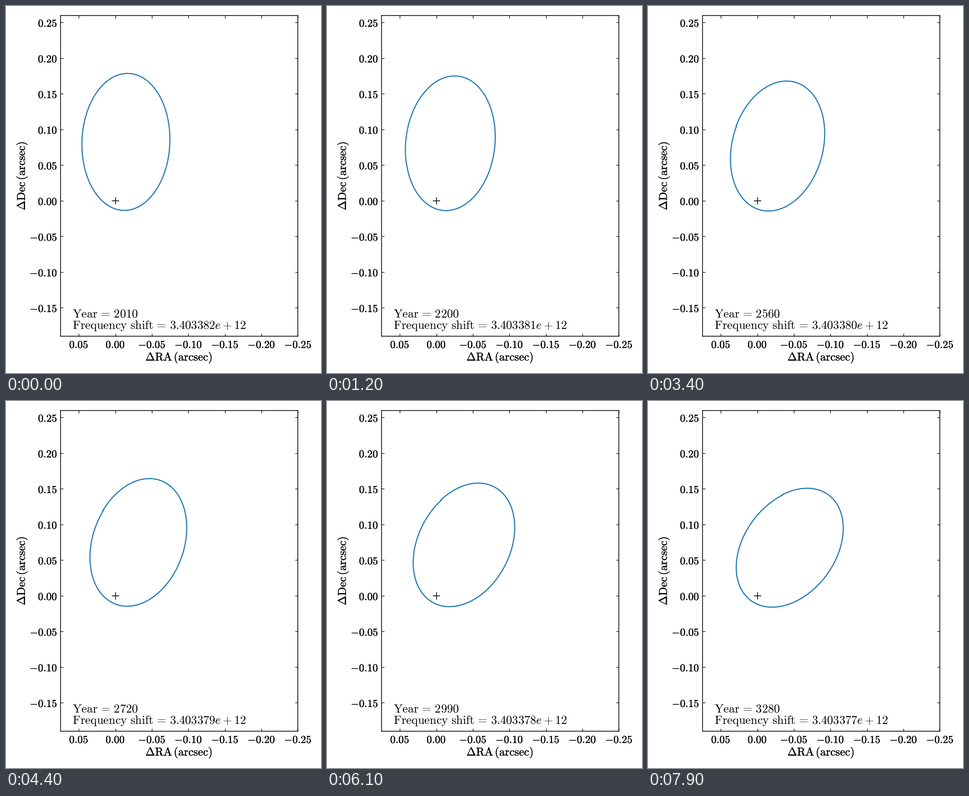
Recreate the animation shown at these times as a matplotlib script. Size 693 by 808 pixels, loop 8 s.

```python
import numpy as np
import matplotlib.pyplot as plt
from matplotlib.animation import FuncAnimation
from matplotlib.patheffects import withStroke

W, H, DPI = 693, 808, 64
PT = 72 / DPI  # points per pixel
FRAMES, INTERVAL = 80, 100

# Orbit: eccentricity and projected semi-axis vectors (RA, Dec) in arcsec
ECC = 0.884
MINOR = np.sqrt(1 - ECC**2)
P = np.array([0.01638, -0.0933])
Q = np.array([0.1239, 0.0486])
PRECESSION = np.radians(0.2038)  # per revolution
YEARS_PER_FRAME = 16.1

plt.rcParams["mathtext.fontset"] = "cm"
bolder = [withStroke(linewidth=0.35 * PT, foreground="black")]


def eccentric_anomaly(mean):
    E = mean + ECC * np.sin(mean)
    for _ in range(30):
        E -= (E - ECC * np.sin(E) - mean) / (1 - ECC * np.cos(E))
    return E


def orbit(i):
    """One revolution, with the periapsis advancing along the way."""
    start = eccentric_anomaly(0.025 + 0.0195 * i)
    E = start + np.linspace(0, 2 * np.pi, 500)
    beta = ECC / (1 + MINOR)
    nu = E + 2 * np.arctan(beta * np.sin(E) / (1 - beta * np.cos(E)))
    turn = PRECESSION * (i + (nu - np.pi) / (2 * np.pi))
    u, v = np.cos(E) - ECC, MINOR * np.sin(E)
    along = u * np.cos(turn) - v * np.sin(turn)
    across = u * np.sin(turn) + v * np.cos(turn)
    return np.outer(P, along) + np.outer(Q, across)


def label(x, y, text, size, **kw):
    """Text with its baseline at a pixel position measured from the top left."""
    return fig.text(x / W, 1 - y / H, text, fontsize=size * PT,
                    va="baseline", **kw)


fig = plt.figure(figsize=(W / DPI, H / DPI), dpi=DPI, facecolor="white")
left, right, top, bottom = 120, 642.3, 20.5, 727
ax = fig.add_axes([left / W, 1 - bottom / H,
                   (right - left) / W, (bottom - top) / H])
ax.set_xlim(0.075, -0.25)
ax.set_ylim(-0.19, 0.26)

xticks = np.arange(-5, 2) * 0.05
yticks = np.arange(-3, 6) * 0.05
ax.set_xticks(xticks, [f"${v:.2f}$" for v in xticks])
ax.set_yticks(yticks, [f"${v:.2f}$" for v in yticks])
ax.tick_params(direction="in", top=True, right=True, length=6 * PT,
               width=1.3 * PT, pad=7 * PT, labelsize=23.5 * PT)
for tick in ax.get_xticklabels() + ax.get_yticklabels():
    tick.set_path_effects(bolder)
for spine in ax.spines.values():
    spine.set_linewidth(1.6 * PT)

label(380.5, 780.5, r"$\Delta\mathrm{RA}\,\mathrm{(arcsec)}$", 25.2,
      ha="center", path_effects=bolder)
label(41.5, 374, r"$\Delta\mathrm{Dec}\,\mathrm{(arcsec)}$", 25.2,
      ha="center", rotation=90, rotation_mode="anchor", path_effects=bolder)

ax.plot(0, 0, "+", color="black", ms=16 * PT, mew=1.6 * PT)
curve, = ax.plot([], [], color="#1f77b4", lw=2.4 * PT)
year_text = label(146, 685.5, "", 26.4)
shift_text = label(146, 711, "", 26.4)
EQUALS = r"\hspace{0.133}=\hspace{0.133}"


def update(i):
    curve.set_data(*orbit(i))
    year = 10 * round((2010 + YEARS_PER_FRAME * i) / 10)
    shift = 3.403382e12 - 1e6 * ((i + 15) // 18)
    year_text.set_text(rf"$\mathrm{{Year}}{EQUALS}{year}$")
    shift_text.set_text(
        rf"$\mathrm{{Frequency\ shift}}{EQUALS}{shift:.6e}$")
    return curve, year_text, shift_text


anim = FuncAnimation(fig, update, frames=FRAMES, interval=INTERVAL,
                     repeat=True, repeat_delay=0)
plt.show()
```
